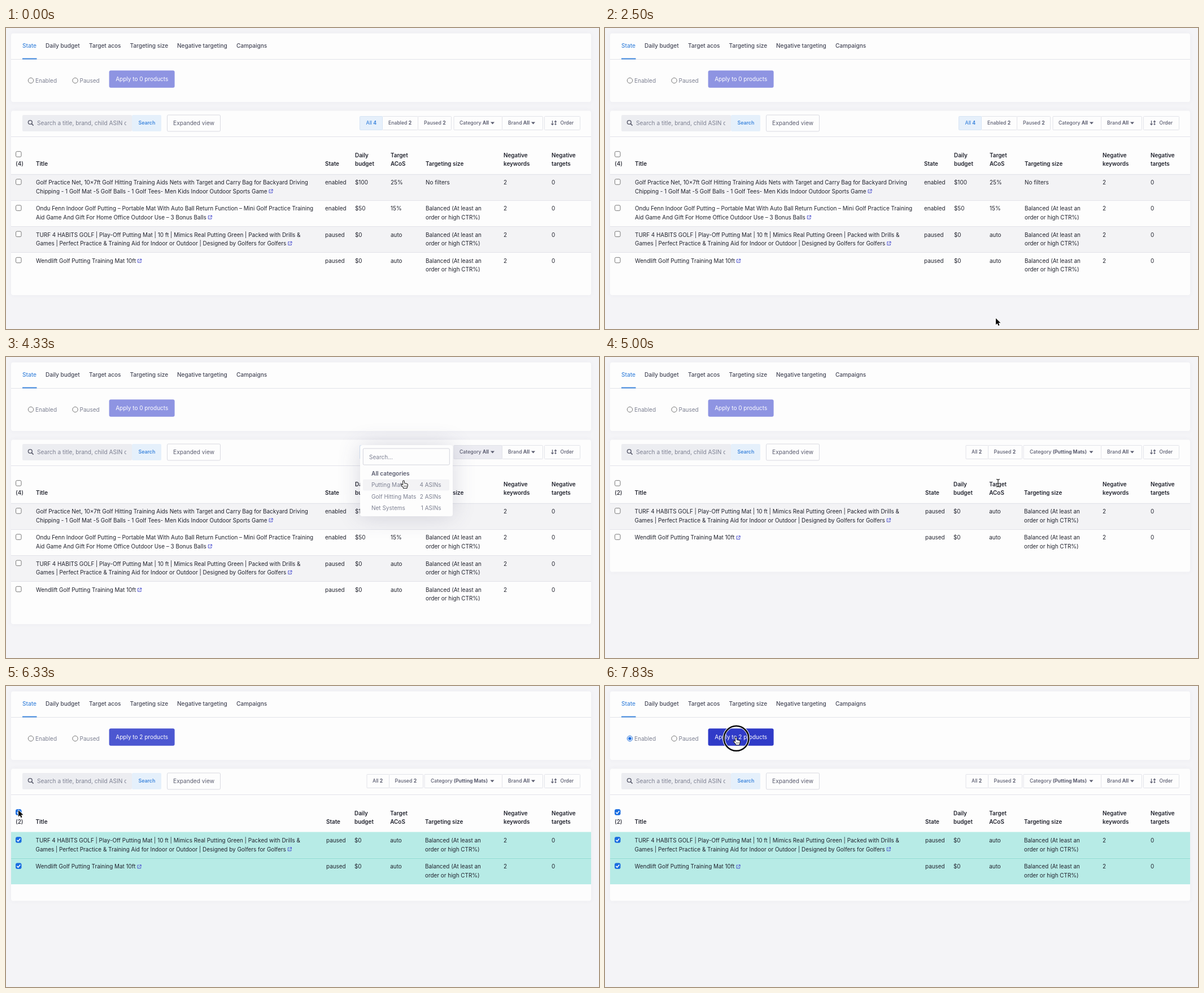
These frames come from a looping animation (1050 by 533 pixels, 8000 ms). An HTML page with a canvas:

```html
<!DOCTYPE html>
<html>
<head>
<meta charset="utf-8">
<style>
html, body { margin: 0; width: 100%; height: 100%; overflow: hidden; background: #f4f4f7; }
canvas { display: block; width: 1050px; height: 533px; }
</style>
</head>
<body>
<canvas id="stage"></canvas>
<script>
const W = 1050, H = 533, LOOP = 8000, STEPS_PER_MS = 0.006;
const canvas = document.getElementById('stage');
const ctx = canvas.getContext('2d');
const ratio = window.devicePixelRatio || 1;
canvas.width = W * ratio;
canvas.height = H * ratio;

const INK = '#20222d', GREY = '#5b5d70', SOFT = '#7d8092', LINE = '#e2e3e9', BLUE = '#3f87dd', CHECK = '#1a6de0';

// Steps at which the interface changes
const ENTER = 15, OPEN = 22, FILTERED = 29, SELECTED = 38, ENABLED = 43;

// Pointer stops: step, x, y
const STOPS = [
  [15, 692, 514], [20, 836, 170], [22, 836, 170], [26, 704, 220], [28, 704, 220],
  [30, 696, 223], [35, 22, 220], [38, 22, 220], [41, 43, 92], [43, 43, 92], [46, 232, 92], [48, 232, 92]
];
const CLICK_RADIUS = { 21: 20, 28: 20, 37: 15.5, 42: 18, 47: 22 };

const GOLF_NET = { title: ['Golf Practice Net, 10×7ft Golf Hitting Training Aids Nets with Target and Carry Bag for Backyard Driving',
  'Chipping - 1 Golf Mat -5 Golf Balls - 1 Golf Tees- Men Kids Indoor Outdoor Sports Game'],
  state: 'enabled', budget: '$100', acos: '25%', size: ['No filters'] };
const BALANCED = ['Balanced (At least an', 'order or high CTR%)'];
const AUTO_RETURN = { title: ['Ondu Fenn Indoor Golf Putting – Portable Mat With Auto Ball Return Function – Mini Golf Practice Training',
  'Aid Game And Gift For Home Office Outdoor Use – 3 Bonus Balls'],
  state: 'enabled', budget: '$50', acos: '15%', size: BALANCED };
const PUTTING_MATS = [
  { title: ['TURF 4 HABITS GOLF | Play-Off Putting Mat | 10 ft | Mimics Real Putting Green | Packed with Drills &',
    'Games | Perfect Practice & Training Aid for Indoor or Outdoor | Designed by Golfers for Golfers'] },
  { title: ['Wendlift Golf Putting Training Mat 10ft'] }
].map(row => ({ ...row, state: 'paused', budget: '$0', acos: 'auto', size: BALANCED }));
const ALL_ROWS = [GOLF_NET, AUTO_RETURN, ...PUTTING_MATS];

const HAND = new Path2D('M-1.3 .3a1.3 1.3 0 0 1 2.6 0v3.2l4.6 1q1.5 .4 1.3 2l-.7 3.6q-.2 1-.8 1.4v1h-6v-1.2l-3.8-4.6q-.6-1.4 .9-1.5l1.9 1.4z');
const ARROW = new Path2D('M0 0v11.5l2.7-2.5 1.8 4.2 2-.9-1.8-4h3.8z');
const BEAM = new Path2D('M-3-6.5q3 0 3 1.7v10q0 1.7-3 1.7M3-6.5q-3 0-3 1.7M3 6.9q-3 0-3-1.7M-1.8 1h3.6');

function text(str, x, y, { size = 10, weight = 400, color = INK, align = 'left' } = {}) {
  ctx.font = `${weight} ${size}px Inter, sans-serif`;
  ctx.fillStyle = color;
  ctx.textAlign = align;
  ctx.fillText(str, x, y);
  return ctx.measureText(str).width;
}

function box(x, y, w, h, fill, stroke, radius = 2) {
  ctx.beginPath();
  ctx.roundRect(x, y, w, h, radius);
  if (fill) { ctx.fillStyle = fill; ctx.fill(); }
  if (stroke) { ctx.strokeStyle = stroke; ctx.lineWidth = 1; ctx.stroke(); }
}

function shadowBox(x, y, w, h, blur, alpha) {
  ctx.save();
  ctx.shadowColor = `rgba(70, 70, 110, ${alpha})`;
  ctx.shadowBlur = blur * ratio;
  box(x, y, w, h, '#fdfdfd', null, 4);
  ctx.restore();
}

function path(d, x, y, color, width = 1.1) {
  ctx.save();
  ctx.translate(x, y);
  ctx.strokeStyle = color;
  ctx.lineWidth = width;
  ctx.stroke(new Path2D(d));
  ctx.restore();
}

function circle(x, y, r, color, width) {
  ctx.beginPath();
  ctx.arc(x, y, r, 0, 7);
  if (width) { ctx.strokeStyle = color; ctx.lineWidth = width; ctx.stroke(); }
  else { ctx.fillStyle = color; ctx.fill(); }
}

const rule = (y, color = LINE) => { ctx.fillStyle = color; ctx.fillRect(9, y, 1027, 1); };

function checkbox(y, checked) {
  box(17.5, y, 9.5, 9.5, checked ? CHECK : '#fff', checked ? CHECK : '#777');
  if (checked) path('M2 5l2.2 2.2L8 2.6', 17.3, y, '#fff', 1.5);
}

function radio(x, label, on) {
  circle(x, 93, 4.7, on ? CHECK : '#777', 1);
  if (on) circle(x, 93, 2.8, CHECK);
  text(label, x + 8, 96.6, { color: SOFT });
}

function segment(x, right, label, bold, textX, { active, pressed, caret } = {}) {
  box(x, 156.5, right - x, 24, active ? '#e6f0fb' : pressed ? '#ececf2' : null, active ? '#d6e4f4' : LINE, 1);
  const color = active ? BLUE : GREY;
  const style = { size: 8.7, color };
  const w = text(label + ' ', textX, 171, { ...style, weight: 500 });
  text(bold, textX + w, 171, { ...style, weight: 700 });
  if (caret) {
    ctx.beginPath();
    ctx.moveTo(caret, 166.5);
    ctx.lineTo(caret + 7, 166.5);
    ctx.lineTo(caret + 3.5, 170.5);
    ctx.fill();
  }
}

function drawActions(step, hoverApply) {
  shadowBox(9, 9.5, 1027, 121.5, 8, 0.05);
  rule(55);
  const tabs = [['State', 29], ['Daily budget', 70], ['Target acos', 147], ['Targeting size', 219.5], ['Negative targeting', 303], ['Campaigns', 408]];
  tabs.forEach(([label, x], i) => text(label, x, 35.2, { size: 10.05, weight: 500, color: i ? '#454757' : BLUE }));
  ctx.fillStyle = BLUE;
  ctx.fillRect(29, 53.5, 25.5, 2);
  radio(44, 'Enabled', step >= ENABLED);
  radio(122.5, 'Paused', false);
  const selected = step >= SELECTED;
  box(182.6, 75.2, 116, 30.5, !selected ? '#8e94e2' : hoverApply ? '#303bc8' : '#4c57d1', null, 3);
  text(`Apply to ${selected ? 2 : 0} products`, 240.7, 94.2, { color: '#fff', align: 'center' });
}

function drawToolbar(step) {
  box(29, 154, 194, 29, '#ecedf1');
  box(223, 154, 52, 29, '#e5f0fb');
  circle(42.8, 167, 3.4, '#565869', 1.4);
  path('M0 0l3.4 3.4', 45.2, 169.4, '#565869', 1.6);
  ctx.save();
  ctx.beginPath();
  ctx.rect(50, 154, 163, 29);
  ctx.clip();
  text('Search a title, brand, child ASIN or', 55, 172.4, { size: 10.15, color: SOFT });
  ctx.restore();
  text('Search', 234.5, 171.2, { size: 8.8, weight: 600, color: BLUE });
  box(285.5, 154, 94, 29, null, '#d9dae1');
  text('Expanded view', 332.5, 172, { size: 10.15, color: GREY, align: 'center' });

  if (step < FILTERED) {
    segment(666.5, 729.5, 'Enabled', 2, 677);
    segment(729.5, 788.5, 'Paused', 2, 740);
    segment(626.5, 666.5, 'All', 4, 637.5, { active: true });
    segment(793, 878.5, 'Category', 'All', 803, { caret: 858, pressed: step >= OPEN });
  } else {
    segment(639, 678.5, 'All', 2, 649);
    segment(678.5, 738.5, 'Paused', 2, 688.5);
    segment(741, 878.5, 'Category', '(Putting Mats)', 752, { caret: 857.5 });
  }
  segment(878.5, 950.5, 'Brand', 'All', 889, { caret: 930 });
  segment(953.5, 1016.5, 'Order', '', 981.5);
  path('M2.5 0v7.5M.4 5.4l2.1 2.3 2.1-2.3M8 8V.5M6.2 2.4L8 .4l1.8 2M6.4 6.5h3.2', 965, 164, GREY, 1.2);
}

function drawTable(step) {
  const filtered = step >= FILTERED, selected = step >= SELECTED;
  const rows = filtered ? PUTTING_MATS : ALL_ROWS;
  const cols = filtered ? [52.5, 567, 617, 680.3, 742, 881, 966] : [53, 565, 618, 681, 743, 881, 966];
  const heads = [['', 'Title'], ['', 'State'], ['Daily', 'budget'], ['Target', 'ACoS'], ['', 'Targeting size'], ['Negative', 'keywords'], ['Negative', 'targets']];
  checkbox(218.7, selected);
  text(`(${rows.length})`, 17, 244, { weight: 500 });
  heads.forEach((lines, i) => lines.forEach((line, n) => text(line, cols[i], 228.6 + n * 15.4, { weight: 600, size: 9.9 })));

  rows.forEach((row, r) => {
    const top = 258.5 + r * 46.3;
    if (selected || r % 2 === 0) {
      ctx.fillStyle = selected ? '#b7ebe6' : '#f3f3f5';
      ctx.fillRect(9, top, 1027, 46.3);
    }
    rule(Math.round(top), selected ? (r ? '#8edcd3' : '#b7ebe6') : LINE);
  });
  rows.forEach((row, r) => {
    const base = 277.2 + r * 46.2;
    checkbox(267.7 + r * 46.2, selected);
    [row.title, [row.state], [row.budget], [row.acos], row.size, ['2'], ['0']].forEach((lines, i) =>
      lines.forEach((line, n) => {
        const width = text(line, cols[i], base + n * 15.3, { size: 9.92 });
        if (i === 0 && n === lines.length - 1)
          path('M3 1H.6v5.6h5.6V4.2M4 .6h2.8v2.8M6.6 .8L3 4.4', cols[0] + width + 3, base + n * 15.3 - 7.2, '#4a4fd0', 1);
      }));
  });
}

function drawMenu(pointer) {
  shadowBox(627, 156, 164, 126, 40, 0.2);
  box(632.3, 162, 153, 29, '#fdfdfd', '#d3d4dc');
  text('Search...', 643, 180.6, { color: SOFT });
  text('All categories', 647, 209.8, { size: 10.2, weight: 600, color: GREY });
  [['Putting Mats', 4], ['Golf Hitting Mats', 2], ['Net Systems', 1]].forEach(([label, count], i) => {
    const y = 230.2 + i * 20.3;
    if (inside(pointer, 632, y - 13.5, 785, y + 6.3)) box(632, y - 13.5, 153, 19.8, '#f3f3f5');
    text(label, 647, y, { color: SOFT });
    text(count + ' ASINs', 770.5, y, { color: SOFT, align: 'right' });
  });
}

const inside = ([x, y], left, top, right, bottom) => x >= left && x <= right && y >= top && y <= bottom;

function pointerAt(step) {
  const i = STOPS.findIndex(stop => stop[0] > step);
  const [k0, x0, y0] = STOPS[i - 1] || STOPS[0], [k1, x1, y1] = STOPS[i];
  const u = Math.max(0, (step - k0) / (k1 - k0)), e = u * u * (3 - 2 * u);
  return [x0 + (x1 - x0) * e, y0 + (y1 - y0) * e];
}

function drawPointer(step, pointer, hand) {
  const [x, y] = pointer;
  const beam = step >= FILTERED && (inside(pointer, 680, 215, 712, 246) || inside(pointer, 617, 215, 652, 246));
  const radius = CLICK_RADIUS[step];
  if (radius) {
    circle(x + 0.5, y + 0.8, radius, '#fff', 4.6);
    circle(x + 0.5, y + 0.8, radius, '#0a0a0c', 2.6);
  }
  ctx.save();
  ctx.translate(x, y);
  ctx.lineJoin = 'round';
  const shape = beam ? BEAM : hand ? HAND : ARROW;
  ctx.strokeStyle = hand ? '#111' : '#fff';
  ctx.lineWidth = beam ? 2.6 : hand ? 1.2 : 1.6;
  ctx.stroke(shape);
  if (beam) {
    ctx.strokeStyle = '#111';
    ctx.lineWidth = 1.1;
    ctx.stroke(shape);
  } else {
    ctx.fillStyle = hand ? '#fff' : '#0a0a0a';
    ctx.fill(shape);
    if (hand) {
      ctx.lineWidth = 0.7;
      ctx.stroke(shape);
      ctx.stroke(new Path2D('M.8 7.5v2.6M2.8 7.5v2.6M4.8 7.5v2.6'));
    }
  }
  ctx.restore();
}

function draw(now) {
  const step = Math.min(47, Math.floor((now % LOOP + 4) * STEPS_PER_MS));
  const pointer = pointerAt(step);
  const menuOpen = step >= OPEN && step < FILTERED;
  const hoverApply = step >= ENABLED && inside(pointer, 183, 75, 299, 106);
  const hand = hoverApply || (step < FILTERED && inside(pointer, 793, 156, 879, 181)) || (menuOpen && inside(pointer, 627, 192, 791, 282));

  ctx.setTransform(ratio, 0, 0, ratio, 0, 0);
  ctx.fillStyle = '#f4f4f7';
  ctx.fillRect(0, 0, W, H);
  drawActions(step, hoverApply);
  shadowBox(9, 146.5, 1027, step < FILTERED ? 326.5 : 234, 8, 0.05);
  rule(192);
  drawTable(step);
  drawToolbar(step);
  if (menuOpen) drawMenu(pointer);
  if (step >= ENTER) drawPointer(step, pointer, hand);
  requestAnimationFrame(draw);
}
requestAnimationFrame(draw);
</script>
</body>
</html>
```
